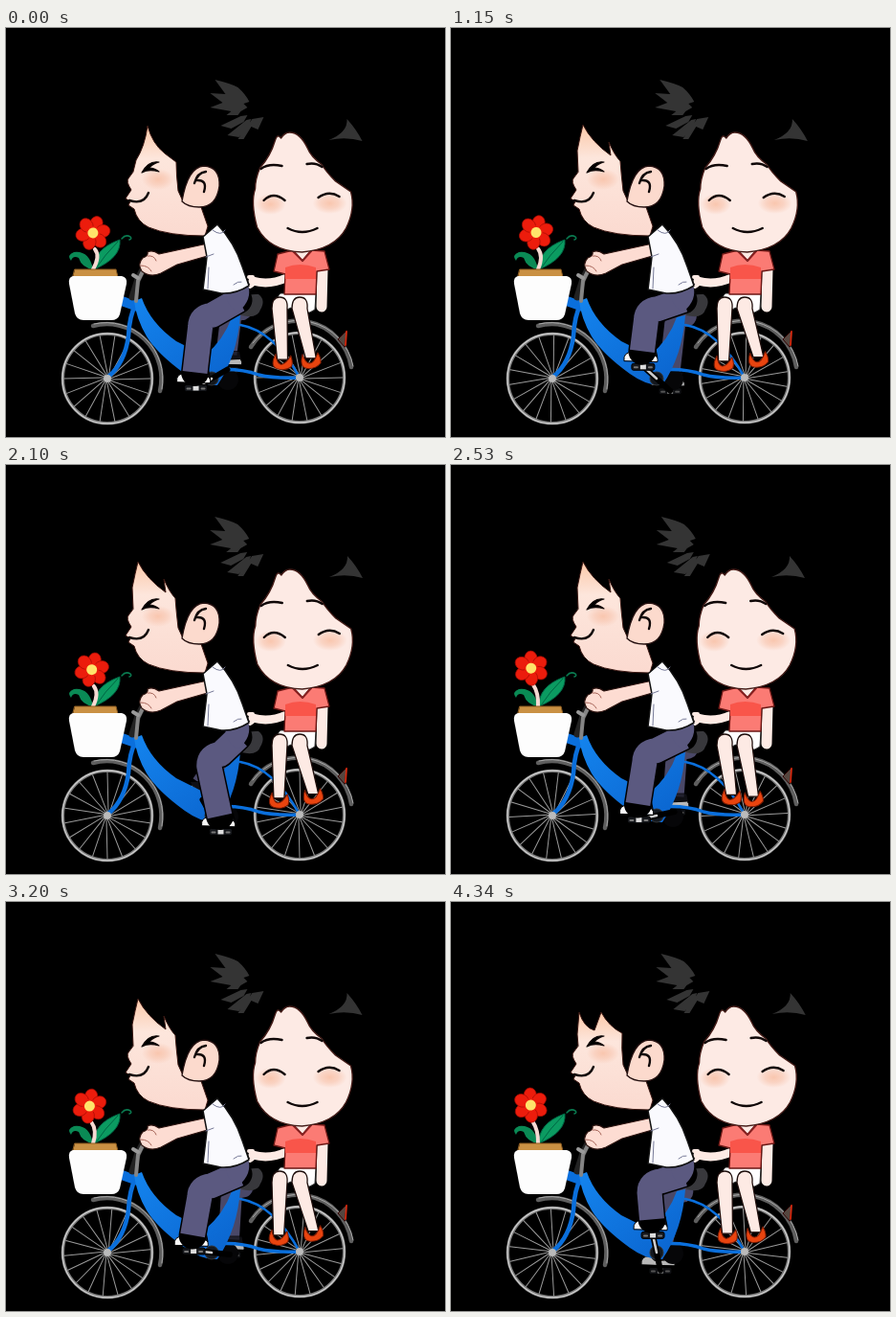
Animation of 459x427 px, one loop 4.37 s. Source, as an HTML page:

```html
<!DOCTYPE html>
<html lang="en">
<head>
<meta charset="utf-8">
<title>Bicycle ride</title>
<style>
html, body { margin: 0; width: 100%; height: 100%; overflow: hidden; background: #000; }
svg { display: block; width: 459px; height: 427px; }
path { stroke-linecap: round; stroke-linejoin: round; }
.ink { fill: none; stroke: #100808; stroke-width: 2.4; }
.blue { fill: none; stroke: #0a6fdc; }
.limb { fill: none; stroke: #fdeae4; }
.edge { fill: none; stroke: #000; }
</style>
</head>
<body>
<svg viewBox="0 0 459 427">
  <defs>
    <linearGradient id="skin" x1="0" y1="0" x2="0" y2="1">
      <stop offset="0" stop-color="#fbc8a8"/><stop offset=".3" stop-color="#fde6dc"/><stop offset="1" stop-color="#fbdad0"/>
    </linearGradient>
    <linearGradient id="paint" x1="0" y1="0" x2="1" y2="1">
      <stop offset="0" stop-color="#1484ee"/><stop offset="1" stop-color="#0a62cc"/>
    </linearGradient>
    <radialGradient id="blush">
      <stop offset="0" stop-color="#f9c6ae"/><stop offset=".5" stop-color="#f9cdba" stop-opacity=".8"/><stop offset="1" stop-color="#f9cdba" stop-opacity="0"/>
    </radialGradient>
    <g id="shoe" stroke="#000">
      <path d="M-13-19H13L15-9H-8Z" fill="#15151b"/>
      <path d="M-20-6Q-21-15-11-15L-6-10L13-11Q16-9 15-5Z" fill="#f6f6f6"/>
      <path d="M-11-15L-7-12" stroke="#333"/>
    </g>
    <g id="pedal">
      <rect x="-12" y="-3" width="24" height="7" rx="2" fill="#16181c" stroke="#000"/>
      <rect x="-3" y="-2" width="6" height="5" fill="#ddd"/>
      <path d="M-9 1H-6M6 1H9" stroke="#777" stroke-width="2"/>
    </g>
  </defs>

  <g id="wheels"></g>
  <path d="M91 311A57 57 0 0 1 161 379" fill="none" stroke="#5e5e5e" stroke-width="4.5"/>
  <path d="M92 309A59 59 0 0 1 163 377" fill="none" stroke="#aaa"/>
  <path d="M256 333A57 57 0 0 1 361 354" fill="none" stroke="#5e5e5e" stroke-width="4.5"/>
  <path d="M258 329A59 59 0 0 1 363 353" fill="none" stroke="#aaa"/>
  <path d="M356 316L347 325L354 333Z" fill="#55463f" stroke="#300"/>
  <path d="M356 317L355 331" stroke="#d52a10" stroke-width="1.8"/>

  <g id="far">
    <path class="edge leg" stroke-width="25"/>
    <path class="leg" fill="none" stroke="#4a4868" stroke-width="22" style="stroke-linecap:butt"/>
    <use href="#pedal" class="foot" opacity=".7"/>
    <use href="#shoe" class="foot" opacity=".75"/>
  </g>
  <circle cx="232" cy="367" r="11" fill="#060608"/>

  <!-- bicycle -->
  <path d="M244 288Q246 277 264 278Q272 284 266 294Q263 304 246 300Z" fill="#38383c"/>
  <path class="blue" d="M245 310Q280 316 307 365" stroke-width="2.6"/>
  <path class="blue" d="M220 357Q244 355 264 362Q280 366 306 365" stroke-width="3.4"/>
  <path class="blue" d="M136 288Q129 300 128 322Q124 350 107 364" stroke-width="4.6"/>
  <path class="blue" d="M121 285L138 291" stroke-width="10" style="stroke-linecap:butt"/>
  <path d="M134 285L142 282Q151 308 178 327L208 342Q228 325 236 302L245 300Q242 342 221 373Q205 374 187 361Q158 340 147 322Q136 303 134 285Z" fill="url(#paint)"/>
  <path d="M132 281L138 262L143 252" fill="none" stroke="#222" stroke-width="7"/>
  <path d="M136 285L138 264L144 252" fill="none" stroke="#858585" stroke-width="4"/>
  <path d="M133 258L138 261" stroke="#999" stroke-width="4"/>
  <circle cx="215" cy="366" r="7" fill="#14181e" stroke="#333"/>
  <g fill="#bbb"><circle cx="106" cy="366" r="4"/><circle cx="307" cy="365" r="4"/></g>

  <!-- flower pot -->
  <path d="M92 252Q91 231 119 221Q121 240 92 252" fill="#0b9b61" stroke="#064"/>
  <path d="M94 251Q103 237 117 223" fill="none" stroke="#064"/>
  <path d="M121 220Q125 215 130 218Q132 220 129 221" fill="none" stroke="#0a7a50" stroke-width="1.5"/>
  <path d="M91 252Q87 232 71 234Q63 237 68 243Q70 237 76 240Q79 250 91 252" fill="#0a8a55"/>
  <path id="stem" fill="none" stroke="#f5d9d2" stroke-width="4"/>
  <g id="flower"></g>
  <path d="M72 252H115L117 260H70Z" fill="#c99043" stroke="#8d5c20"/>
  <path d="M70 259H121Q127 260 126 267L119 299Q117 305 110 305H81Q74 305 72 298L66 267Q65 260 70 259Z" fill="#fdfdfd"/>

  <!-- passenger -->
  <path class="limb" d="M258 264Q275 269 293 261" stroke-width="9"/>
  <path class="limb" d="M258 260L254 260M258 268L255 270" stroke-width="4"/>
  <path class="limb" d="M331 252L330 291" stroke-width="11"/>
  <path d="M287 277H324L323 294Q313 302 298 292Q290 298 279 288Z" fill="#fff" stroke="#222"/>
  <g id="legs"></g>
  <path d="M284 236L300 232L310 243L319 232L333 233L338 252L325 254L324 278H291L292 257L280 254Z" fill="#fb7b74" stroke="#6b1714" stroke-width="1.3"/>
  <path d="M292 250Q307 244 324 250V262H292Z" fill="#f9554a"/>
  <path d="M301 232L310 242L318 232Z" fill="#fdeae4"/>
  <path d="M300 233L310 243L319 233" fill="none" stroke="#822" stroke-width="2"/>
  <g id="girlHead">
    <path d="M296 109Q291 109 287 115Q283 110 281 117Q276 134 265 146Q260 158 260 168Q255 182 262 208Q275 233 309 234
      Q343 231 355 209Q365 189 360 171L344 160Q334 150 330 143Q318 134 315 126Q307 109 296 109Z" fill="#fdeae4" stroke="#431c18" stroke-width="1.4"/>
    <ellipse cx="276" cy="184" rx="16" ry="11" fill="url(#blush)"/>
    <ellipse cx="338" cy="183" rx="18" ry="11" fill="url(#blush)"/>
    <path class="ink" d="M269 180Q279 170 291 180M326 177Q337 169 348 176M294 209Q309 217 325 209"/>
    <path class="ink" d="M266 147Q274 141 288 144M314 142Q323 140 330 145"/>
    <path id="strand" d="M314 128L333 162L338 150Z"/>
  </g>
  <g id="tufts" fill="#343434">
    <path d="M219 54Q236 58 243 62Q251 69 255 77L249 79L253 83L246 87L243 91L231 91L236 87L214 83L227 78L214 68L230 69Z"/>
    <path d="M225 102L246 92L253 91L249 98L236 105ZM232 112L252 96L257 95L253 104L244 114ZM243 116L258 95L270 93L264 106L257 103L249 116Z"/>
  </g>
  <path id="bow" d="M356 95Q366 106 372 118Q355 113 337 117Q357 109 356 95Z" fill="#343434"/>

  <!-- rider -->
  <path id="boyFace" fill="url(#skin)" stroke="#3a1712"/>
  <path d="M184 181Q190 145 207 144Q224 145 223 165Q220 187 202 187Q190 187 184 181" fill="#fcdacd" stroke="#241010" stroke-width="1.3"/>
  <path class="ink" d="M197 162Q200 151 209 150M199 159Q211 158 207 171"/>
  <ellipse cx="159" cy="158" rx="17" ry="11" fill="url(#blush)"/>
  <path d="M142 151Q149 138 160 140Q153 142 150 146Q155 146 160 150Q149 147 142 151Z" stroke="#100808" stroke-width="1.2"/>
  <path class="ink" d="M129 180Q144 185 149 172"/>

  <g id="near">
    <g id="crank"></g>
    <use href="#pedal" class="foot"/>
    <use href="#shoe" class="foot"/>
    <path class="edge leg" stroke-width="29"/>
    <path class="leg" fill="none" stroke="#5b5980" stroke-width="26" style="stroke-linecap:butt"/>
  </g>
  <path d="M228 271L253 268Q258 284 243 296Q232 294 228 271Z" fill="#5b5980"/>
  <path d="M211 225L160 236Q153 231 148 234Q149 238 143 240Q137 246 142 254Q151 261 162 256L179 247L214 237Z" fill="#fddcd2" stroke="#2d1410" stroke-width="1.2"/>
  <path d="M148 238Q155 237 157 243M141 248Q149 248 152 254" fill="none" stroke="#a7665a"/>
  <path d="M206 218L221 205Q239 224 247 249L254 269Q240 278 225 277L206 273L209 248L210 239Z" fill="#fafafe" stroke="#111" stroke-width="1.5"/>
  <path d="M209 239L217 236M216 211Q225 218 229 211M212 250L211 272M238 268Q243 264 246 265" fill="none" stroke="#777a98"/>
</svg>
<script>
const $ = id => document.getElementById(id);
const wave = (i, peak) => Math.cos((i - peak) * Math.PI / 15);

// Time in ms, step number
const pace = [[0, 0], [129.9, .9], [130, 2], [630, 19], [660, 20], [1180, 37], [1210, 38], [1700, 52],
  [1740, 53], [2250, 70], [2280, 71], [2800, 88], [2830, 89], [3200, 98], [3340, 103], [3370, 104],
  [3880, 121], [3910, 122], [4340, 134], [4370, 134.9]];

const hairEdges = [
  'L136 138Q145 124 148 102Q153 121 166 131L178 140',
  'L132 128Q135 113 138 101Q147 119 167 133L165 119Q171 133 177 139',
  'L132 138L134 115Q139 131 150 134L157 115Q165 130 179 137'];

$('wheels').innerHTML = [[106, 366], [307, 365]].map(([x, y]) => {
  let spokes = '';
  for (let a = 0; a < 360; a += 20) spokes += `<path d="M4 1L45 0" transform="rotate(${a})"/>`;
  return `<g transform="translate(${x} ${y})"><circle r="46.6" fill="#000" stroke="#777" stroke-width="3.4"/>
    <circle r="47" fill="none" stroke="#ccc" stroke-width="1.4"/><g class="spokes" stroke="#9a9a9a">${spokes}</g></g>`;
}).join('');
const spokes = document.querySelectorAll('.spokes');

let petals = '';
for (let a = 0; a < 360; a += 60)
  petals += `<ellipse cy="-10.5" rx="6.6" ry="7.6" fill="#ec1c0c" stroke="#a80c04" stroke-width=".7" transform="rotate(${a + 8})"/>`;
$('flower').innerHTML = petals + '<circle r="7" fill="#ec1c0c"/><circle r="5.5" fill="#ffe36a"/>';

function setLeg(id, px, py, kneeShift) {
  const ax = px - 1, ay = py - 16;
  const kx = 204 + kneeShift + (ax - 200) * .35, ky = 292 + (ay - 340) * .3;
  for (const leg of $(id).querySelectorAll('.leg'))
    leg.setAttribute('d', `M243 284L${kx + 12} ${ky + 2}Q${kx} ${ky + 3} ${kx} ${ky + 14}L${ax} ${ay}`);
  for (const foot of $(id).querySelectorAll('.foot'))
    foot.setAttribute('transform', `translate(${px} ${py})`);
}

const girlLeg = (knee, x, y, tilt) => `
  <path d="M${knee - 8} 293Q${knee - 8} 281 ${knee} 281Q${knee + 9} 281 ${knee + 8} 293L${x + 5.5} ${y - 3}H${x - 5.5}Z" fill="#fdeae4" stroke="#1c0c0a" stroke-width="1.3"/>
  <path d="M-8-8Q-13 5-5 7Q4 9 10 3Q11-2 8-8Q3 3-2 2Q-6 1-8-8Z" fill="#e9440f" stroke="#7d1c04" transform="translate(${x} ${y}) rotate(${tilt})"/>`;

function draw(t) {
  const n = pace.findIndex(p => p[0] > t);
  const [t0, i0] = pace[n - 1], [t1, i1] = pace[n];
  const i = Math.floor(i0 + (i1 - i0) * (t - t0) / (t1 - t0) + .01);

  const a = (150 - 18 * i) * Math.PI / 180, dx = 19 * Math.cos(a), dy = 19 * Math.sin(a);
  setLeg('near', 215 + dx, 366 + dy, 0);
  setLeg('far', 215 - dx, 366 - dy, 20);
  $('crank').innerHTML = `<path d="M${215 - dx} ${366 - dy}L${215 + dx} ${366 + dy}" stroke="#000" stroke-width="6"/>
    <path d="M215 366L${215 + dx} ${366 + dy}" stroke="#ccc" stroke-width="2.6"/>`;
  for (const s of spokes) s.setAttribute('transform', `rotate(${-18 * i})`);

  const sway = wave(i, 1), fx = 87 + 4 * sway, fy = 213 + sway;
  $('flower').setAttribute('transform', `translate(${fx} ${fy}) rotate(${sway * 12})`);
  $('stem').setAttribute('d', `M${fx + 2} ${fy + 17}Q${fx + 8} 238 91 252`);

  $('boyFace').setAttribute('d', 'M133 150' + hairEdges[[0, 1, 2, 1][Math.floor(i % 20 / 5)]] +
    'Q178 153 180 170L185 181L204 187L211 207L208 217Q170 217 149 208Q137 202 134 189L128 185L130 181L125 178L131 169Q125 160 128 157Z');

  const swing = wave(i, 22);
  $('legs').innerHTML = girlLeg(307, 318.5 - 3 * swing, 348 + 1.5 * swing, -6) +
    girlLeg(286, 289.5 + 4.5 * swing, 349 - 2 * swing, 6);
  const lean = wave(i, 4);
  $('girlHead').setAttribute('transform', `translate(${lean * .8} 0)`);
  $('bow').setAttribute('transform', `translate(${lean * 1.5 - .5} 0)`);
  $('tufts').setAttribute('transform', `translate(${-lean * .8} 0)`);
  $('strand').style.display = Math.abs(i % 30 - 26) < 3 ? '' : 'none';
}

const start = performance.now();
function tick() {
  draw((performance.now() - start) % 4370);
  requestAnimationFrame(tick);
}
tick();
</script>
</body>
</html>
```
